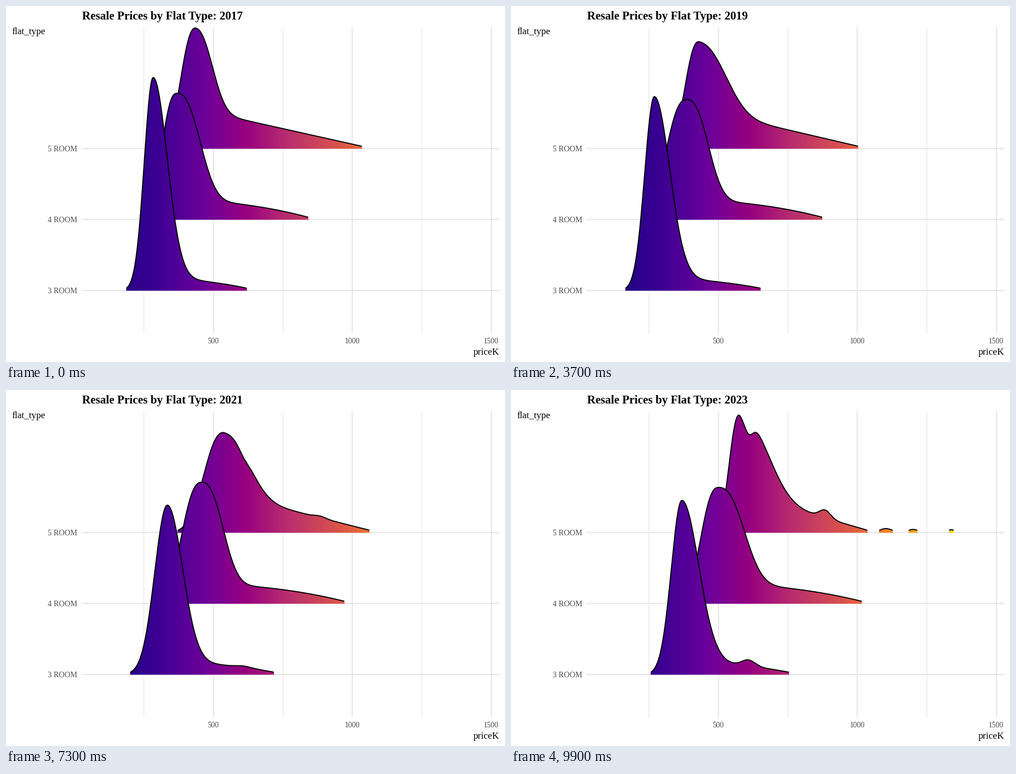
Write a matplotlib script that moves like this. It is 885x632 px and loops after 10000 ms.

```python
import numpy as np
import matplotlib.pyplot as plt
from matplotlib.animation import FuncAnimation
from matplotlib.colors import LinearSegmentedColormap
from matplotlib.path import Path

W, H, DPI = 885, 632, 100
FRAMES = 100
PT = 72 / DPI
TOP = 38       # upper edge of the panel
EDGE = 4       # a ridge is drawn only where it is at least this high
X = np.arange(190, 811, 0.5)

plt.rcParams["font.family"] = "Liberation Serif"

# Each ridge is a hump with a long right tail. The tracks give its peak
# position, height, left and right half-widths and right end at KEYS.
KEYS = (0, 20, 47, 62, 99)
RIDGES = {
    5: dict(base=253, power=2.3, tail=70, bend=1,
            peak=(336, 328, 336, 377, 406), height=(214, 208, 179, 163, 212),
            left=(29, 27, 27, 46, 21), right=(33, 42, 60, 47, 56),
            end=(631, 621, 613, 650, 632)),
    4: dict(base=379, power=2.5, tail=33, bend=2,
            peak=(303, 303, 317, 338, 368), height=(224, 213, 213, 219, 206),
            left=(29, 37, 42, 40, 34), right=(44, 43, 39, 37, 49),
            end=(536, 541, 559, 591, 622)),
    3: dict(base=505, power=2, tail=20, bend=2,
            peak=(261, 253, 255, 279, 303), height=(378, 356, 337, 297, 309),
            left=(18.5, 19.5, 20.5, 28, 22), right=(29, 33, 31, 30, 35),
            end=(427, 427, 452, 468, 493)),
}
# Bumps that grow late in the loop: room, centre, height, width
BUMPS = [(5, 421, -28, 8), (5, 557, 14, 10), (5, 665, 7, 11),
         (5, 713, 5.5, 9), (5, 781, 5, 6), (3, 421, 11, 12)]
BUMP_START = 66


def heights(room, t):
    r = RIDGES[room]
    peak, height, left, right, end = (
        np.interp(t, KEYS, r[k]) for k in ("peak", "height", "left", "right", "end"))
    d = X - peak
    hump = 0.5 ** (np.abs(d) / np.where(d < 0, left, right)) ** r["power"]
    v = np.clip(d / (end - peak), 0, 1)
    tail = r["tail"] * (1 - v ** r["bend"]) + EDGE * v
    h = np.where(d < 0, height * hump, (height - r["tail"]) * hump + tail)
    h[X > end] = 0
    grow = max(0, (t - BUMP_START) / (FRAMES - 1 - BUMP_START))
    for owner, centre, size, width in BUMPS:
        if owner == room:
            h += grow * size * np.exp(-((X - centre) / width) ** 2 / 2)
    return h


STOPS = [(190, "#200080"), (260, "#390092"), (320, "#590099"), (360, "#710098"),
         (422, "#960080"), (500, "#b82e6e"), (600, "#de5848"), (660, "#f07e31"),
         (710, "#fb9f20"), (785, "#f2d518"), (810, "#f0e81c")]
cmap = LinearSegmentedColormap.from_list(
    "heat", [((x - 190) / 620, c) for x, c in STOPS], N=1024)

fig = plt.figure(figsize=(W / DPI, H / DPI), dpi=DPI, facecolor="white")
ax = fig.add_axes([0, 0, 1, 1])
ax.axis("off")


def label(x, y, text, size, color="black", **kw):
    return ax.text(x, y, text, fontsize=size * PT, color=color, va="baseline", **kw)


def grid(xs, ys, width):
    ax.plot(xs, ys, color="#e7e7e7", lw=width * PT, zorder=0, solid_capstyle="butt")


# Grid lines every 250 on the price axis, thick and labelled at every 500
for price in range(250, 1501, 250):
    x = 121.1 + 0.493 * price
    major = price % 500 == 0
    grid([x, x], [TOP, 581], 2.1 if major else 1.1)
    if major:
        label(x, 599, str(price), 13.5, "#4d4d4d", ha="center")
for room, r in RIDGES.items():
    grid([135, 875], [r["base"] + 0.3] * 2, 2.1)
    label(126.5, r["base"] + 5.5, f"{room} ROOM", 13.9, "#4d4d4d", ha="right")

label(10, 50, "flat_type", 16.6)
label(875.5, 619, "priceK", 17, ha="right")
title = label(135, 24, "", 20.6, weight="bold")

# One gradient image and one outline per ridge, back to front
fills, lines = {}, {}
for z, room in enumerate(RIDGES, 1):
    fills[room] = ax.imshow(np.linspace(0, 1, 1240)[None], cmap=cmap,
                            extent=(190, 810, H, 0), aspect="auto", zorder=z)
    lines[room], = ax.plot([], [], color="black", lw=1.9 * PT, zorder=z + 0.5,
                           solid_capstyle="butt", solid_joinstyle="round")
ax.set_xlim(0, W)
ax.set_ylim(H, 0)


def update(frame):
    year = round(2017 + 6 * frame / (FRAMES - 1))
    title.set_text(f"Resale Prices by Flat Type: {year}")
    for room, r in RIDGES.items():
        h = heights(room, frame)
        on = h >= EDGE - 0.2
        y = np.maximum(r["base"] - h, TOP)
        floor = r["base"] + 0.5
        lines[room].set_data(X, np.where(on, y, np.nan))
        top = np.where(on, y, floor)
        outline = np.c_[np.r_[X, X[-1], X[0], X[0]],
                        np.r_[top, floor, floor, top[0]]]
        fills[room].set_clip_path(Path(outline), ax.transData)
    return [title, *fills.values(), *lines.values()]


anim = FuncAnimation(fig, update, frames=FRAMES, interval=100, repeat=True,
                     repeat_delay=0, blit=False)
plt.show()
```
